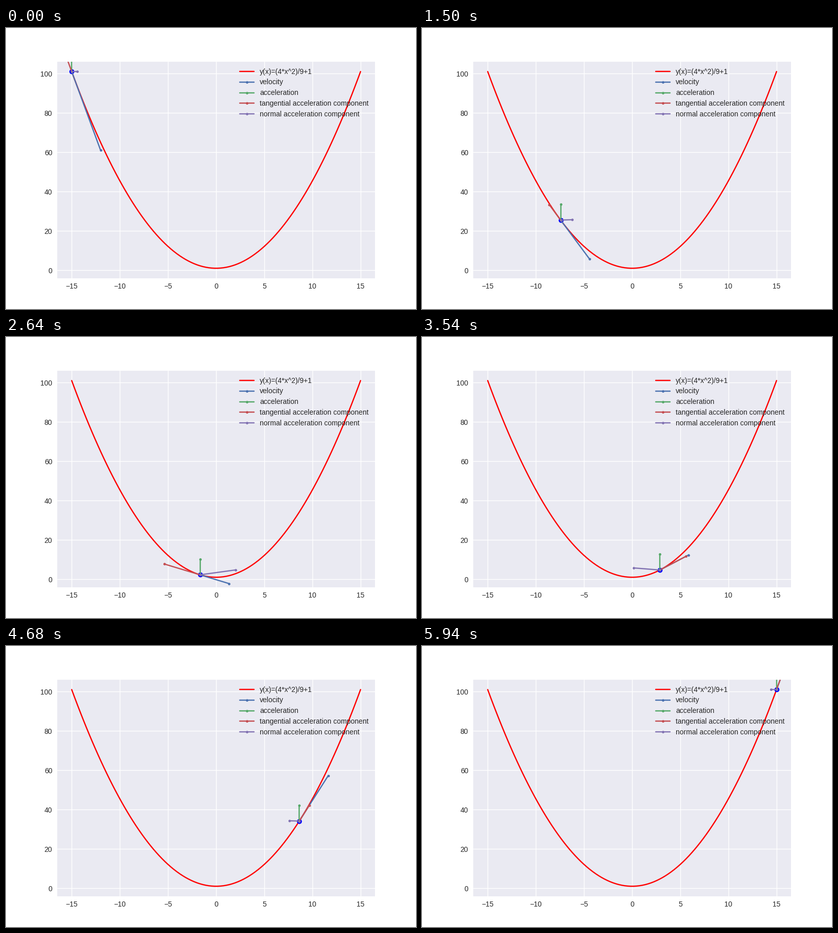
A matplotlib script for the animation above (6000 ms loop, 800x550 px).

```python
import matplotlib.pyplot as plt
import numpy as np
from matplotlib.animation import FuncAnimation

FRAMES = 100
SPEED_X = 3   # constant horizontal speed
ACCEL = 8     # constant vertical acceleration

plt.style.use("seaborn-v0_8")
plt.rcParams["font.family"] = "Liberation Sans"


def height(x):
    return 4 * x**2 / 9 + 1


def vectors(x):
    """Velocity, acceleration and its tangential and normal components."""
    vel = np.array([SPEED_X, SPEED_X * 8 * x / 9])
    acc = np.array([0, ACCEL])
    tangential = vel * (acc @ vel) / (vel @ vel)
    return vel, acc, tangential, acc - tangential


xs = np.linspace(-15, 15, FRAMES)

fig, ax = plt.subplots(figsize=(8, 5.5), dpi=100)
ax.plot(xs, height(xs), color="red", label="y(x)=(4*x^2)/9+1")
ax.set_xlim(-16.5, 16.5)
ax.set_ylim(-4, 106)

body, = ax.plot([], [], "o", color="blue")
names = ["velocity", "acceleration", "tangential acceleration component",
         "normal acceleration component"]
colors = ["#4C72B0", "#55A868", "#C44E52", "#8172B2"]
arrows = [ax.plot([], [], ".-", color=c, label=n)[0]
          for n, c in zip(names, colors)]
ax.legend(loc="upper right")


def update(i):
    x, y = xs[i], height(xs[i])
    body.set_data([x], [y])
    for arrow, (dx, dy) in zip(arrows, vectors(x)):
        arrow.set_data([x, x + dx], [y, y + dy])
    return [body, *arrows]


anim = FuncAnimation(fig, update, frames=FRAMES, interval=60,
                     repeat=True, repeat_delay=0)
plt.show()
```
